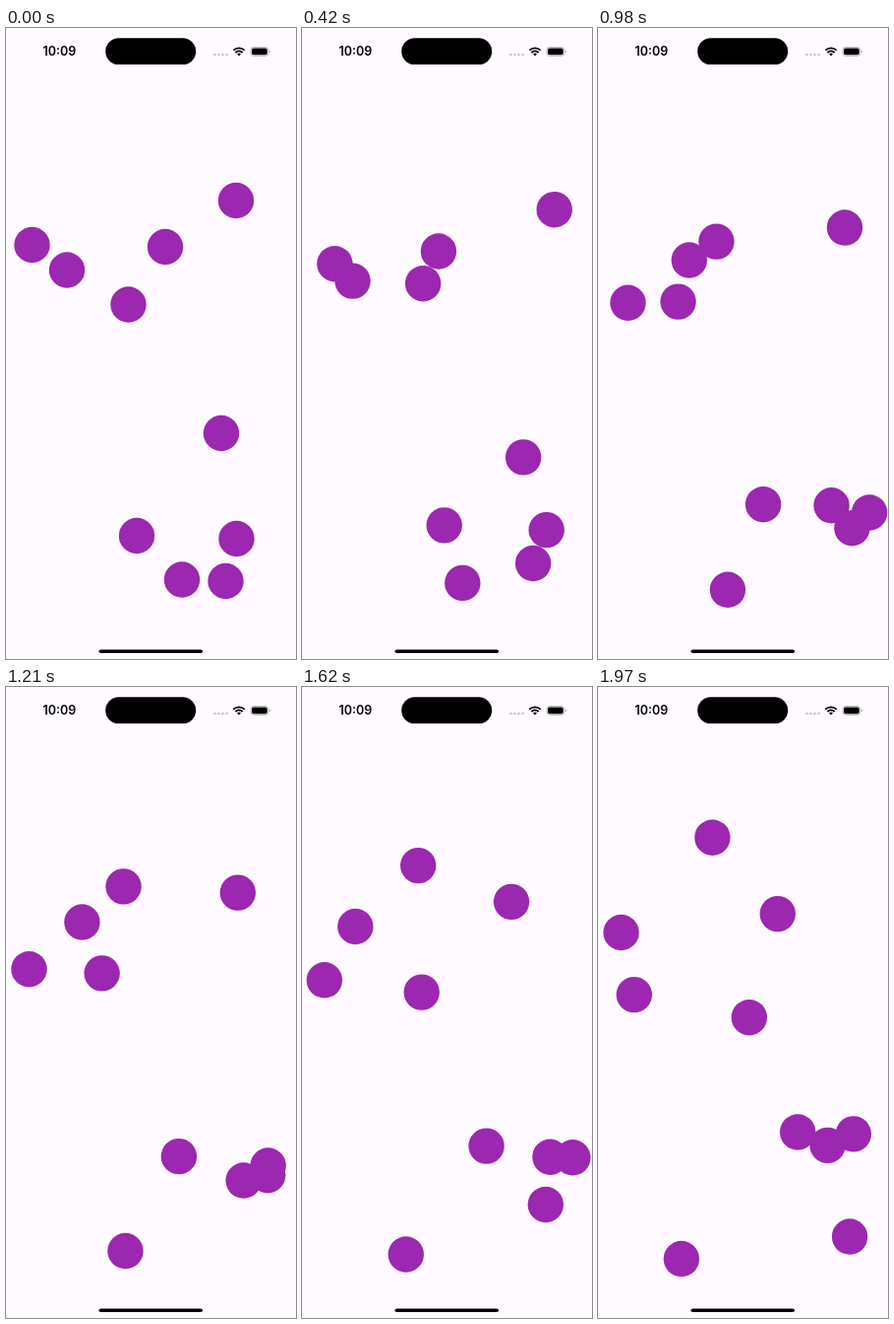
An HTML page that plays this animation: 295x640 px, repeating every 1.99 s.

```html
<!DOCTYPE html>
<html lang="en">
<head>
<meta charset="utf-8">
<title>Bouncing balls</title>
<style>
  html, body { margin: 0; width: 100%; height: 100%; overflow: hidden; background: #fefaff; }
  svg { display: block; }
  text { font: 600 12.5px Inter, sans-serif; text-anchor: middle; }
</style>
</head>
<body>
<svg width="295" height="640" viewBox="0 0 295 640">
  <g id="balls" fill="#9c27b0"></g>
  <text x="54.3" y="28.2">10:09</text>
  <rect x="101.2" y="10.2" width="92" height="26.9" rx="13.45"/>
  <path d="M212.4 27.1h12.2" stroke="#c4c1c6" stroke-width="2.5" stroke-linecap="round" stroke-dasharray="0 4.05"/>
  <g fill="none" stroke="#000" stroke-width="1.9">
    <path d="M231.3 22.7a8.1 8.1 0 0 1 11.4 0"/>
    <path d="M233.4 25a5.1 5.1 0 0 1 7.2 0"/>
  </g>
  <path d="M237 28.5l-1.9-2a2.7 2.7 0 0 1 3.8 0z"/>
  <rect x="248.9" y="19.5" width="17.9" height="8.8" rx="2.8" fill="none" stroke="#aaa8ac" stroke-width=".8"/>
  <rect x="250" y="20.6" width="15.7" height="6.6" rx="1.8"/>
  <path d="M267.8 22.5q1.2.4 1.2 1.4t-1.2 1.4z" fill="#aaa8ac"/>
  <rect x="94.5" y="630.4" width="105.5" height="3.6" rx="1.8"/>
</svg>
<script>
const LOOP = 1990, STEP = 108.4;
const RADIUS = 18.2, LEFT = 17.9, RIGHT = 276.6;
const group = document.getElementById("balls");

// Each ball flies straight at constant speed and bounces off the side walls
function ball(x, y, vx, vy) {
  const circle = document.createElementNS("http://www.w3.org/2000/svg", "circle");
  circle.setAttribute("r", RADIUS);
  group.append(circle);
  return step => {
    circle.setAttribute("cx", bounce(x + vx * step));
    circle.setAttribute("cy", y + vy * step);
  };
}

// Mirrors an unbounded position back between the walls
function bounce(x) {
  const span = RIGHT - LEFT;
  const phase = Math.abs(x - LEFT) % (2 * span);
  return LEFT + span - Math.abs(span - phase);
}

const movers = [
  ball(234, 175, 7.58, 3.06),
  ball(26.5, 220, -8.03, 6.4),
  ball(62, 245.5, -3.5, 3.7),
  ball(124.5, 280.5, -0.45, -7.1),
  ball(162, 222, -7.69, 1.5),
  ball(219, 411, 2.06, 8.14),
  ball(133, 515, 3.9, -3.53),
  ball(234.5, 518, 4.73, -2.95),
  ball(179, 559.5, -5.23, 1.14),
  ball(223.5, 561, 3.88, -5.98)
];

const start = performance.now();
function loop() {
  const time = (performance.now() - start) % LOOP;
  const step = Math.floor(time / STEP);
  movers.forEach(move => move(step));
  requestAnimationFrame(loop);
}
loop();
</script>
</body>
</html>
```
